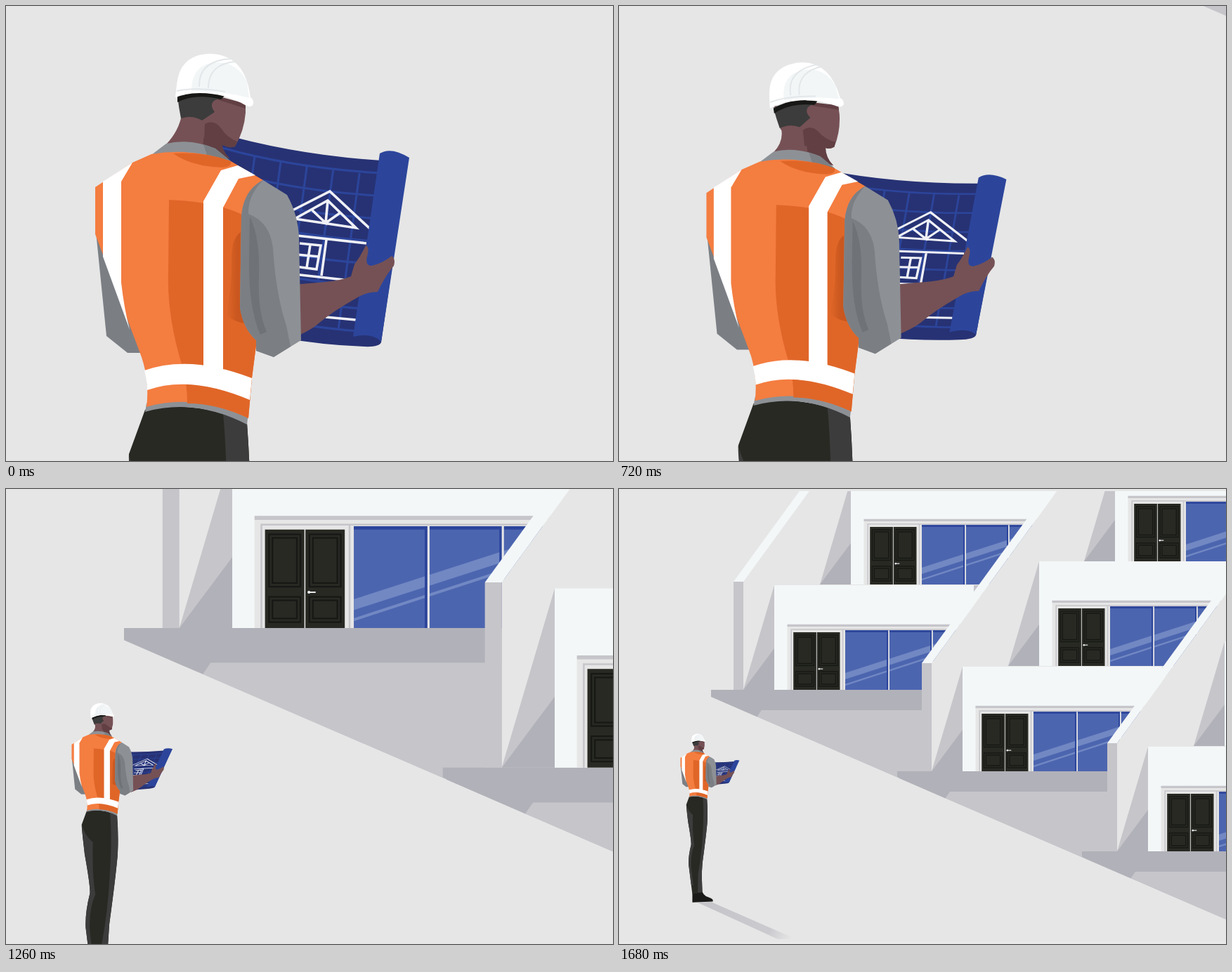
An HTML page that plays this animation: 864 px wide and 648 px high, repeating every 4200 ms.

```html
<!DOCTYPE html>
<html lang="en">
<head>
<meta charset="utf-8">
<title>Site survey</title>
<style>
html, body { margin: 0; width: 100%; height: 100%; overflow: hidden; background: #e6e6e6; }
svg { display: block; width: 100vw; height: 100vh; }
.line { fill: none; stroke: #f0f1f6; stroke-width: 3.6; }
.panel { fill: none; stroke: #171815; stroke-width: 1.3; }
</style>
</head>
<body>
<svg viewBox="0 0 864 648" preserveAspectRatio="none">
<defs>
  <linearGradient id="cast" gradientUnits="userSpaceOnUse" x1="320" y1="1430" x2="1030" y2="1740">
    <stop offset=".1" stop-color="#c6c5ca"/><stop offset=".75" stop-color="#cbcacf"/><stop offset="1" stop-color="#e6e6e6"/>
  </linearGradient>
  <linearGradient id="fold" x1="0" x2="1">
    <stop offset="0" stop-color="#c9571f" stop-opacity="0"/><stop offset=".6" stop-color="#c9571f"/>
  </linearGradient>
  <clipPath id="pane"><path d="M322 201.3H505V286H322z"/></clipPath>

  <g id="leaf">
    <path d="M0 0H32.7V82H0z" fill="#282923"/>
    <path class="panel" d="M3.3 4H29.4V47.5H3.3zM6.2 7H26.5V44.5H6.2zM3.3 56H29.4V77H3.3zM6.2 59H26.5V74H6.2z"/>
  </g>

  <g id="storey">
    <path d="M177 286L221 137V286z" fill="#c6c5ca"/>
    <path d="M177 286L221 227V286z" fill="#b1b1b9"/>
    <path d="M505 137h14v14h-14z" fill="#c6c5ca"/>
    <path d="M221 137H505V286H221z" fill="#f3f7f8"/>
    <path d="M239.5 193H505V286H239.5z" fill="#e6e6e6"/>
    <path d="M239.5 192.7H505V196H239.5z" fill="#c6c5ca"/>
    <path d="M245.2 286V200H505M318.5 286V200" fill="none" stroke="#c6c5ca" stroke-width="1.5"/>
    <use href="#leaf" x="248.2" y="204"/><use href="#leaf" x="281.8" y="204"/>
    <path d="M284.5 256.2H290.3" stroke="#f3f7f8" stroke-width="1.1"/>
    <circle cx="284.7" cy="256.2" r="1.2" fill="#f3f7f8"/>
    <g clip-path="url(#pane)">
      <path d="M322 201H505V286H322z" fill="#4c65af"/>
      <path d="M322 262L505 203V212L322 271z" fill="#7188c3"/>
      <path d="M322 277.8L505 218V220.5L322 280.3z" fill="#7188c3"/>
      <path d="M322 201H505V204H322zM381 201h3v85h-3zM443 201h3v85h-3z" fill="#2c459b"/>
      <path d="M383.2 201h1.8v85h-1.8zM445 201h1.8v85h-1.8z" fill="#e6e6e6"/>
    </g>
  </g>

  <g id="column">
    <path d="M203 315H700V542L196 324.200z" fill="#c6c5ca"/>
    <path d="M131 286H520V315H203L196.500 324.400L131 296z" fill="#b1b1b9"/>
    <path d="M177 132V286H800V-268H468z" fill="#e6e6e6"/>
    <path d="M163 132H177V286H163z" fill="#c6c5ca"/>
    <path d="M163 132H177L468 -268H454z" fill="#f3f7f8"/>
    <use href="#storey"/><use href="#storey" x="109" y="-150"/><use href="#storey" x="217" y="-299"/>
  </g>
</defs>

<g id="site">
  <path d="M-100 645H1100V760H-100z" fill="#e9e9e9"/>
  <use href="#column"/><use href="#column" x="268" y="116"/><use href="#column" x="532" y="230"/>
  <path d="M396 402h4v10l-4-2zM659 516h5v10l-5-2z" fill="#b1b1b9"/>
  <path d="M-100 -700H1500V3H-100z" fill="#e6e6e6"/>
</g>

<g id="man">
  <path d="M267 1437L376 1431L1068 1734H919z" fill="url(#cast)"/>

  <g id="plan">
    <path d="M300 180Q410 212 534 220L560 300L534 479Q531 486 510 485Q450 483 390 472L310 300z" fill="#273274"/>
    <path id="grid" fill="none" stroke="#2c459b" stroke-width="3"/>
    <path class="line" d="M396 297L461 264L520 319M411 303L458 277L498 316zM458 277L455 309L436 291M455 309L475 295M410 326.500L513 338M456 333L449 384M410 382L482 390M455 443L498 447M418 338L448 341L442 375L412 371M433 340L428 373M414 354L446 357"/>
    <path d="M532 210Q548 200 574 216L534 478Q522 465 494 471z" fill="#2c459b"/>
  </g>

  <path id="arm" d="M395 398L455 393Q480 390 491 385L496 368Q505 356 512 341Q518 343 514 357Q511 370 520 370Q535 367 549 356Q555 360 552 370Q540 384 529 407Q510 408 497 417Q465 435 445 452Q432 464 395 478z" fill="#755155"/>

  <path d="M128 322L143 470L173 494H196L170 400z" fill="#7b7f84"/>

  <path d="M224 1364L305 1350Q315 1375 335 1385Q385 1402 391 1415V1428L224 1436z" fill="#1a1a18"/>
  <path d="M198 575L175 638Q174 650 180 700L189 779Q216 930 214 965Q190 1060 194 1130L214 1290L224 1368L305 1352L300 1206L306 1113Q335 900 345 790Q351 700 343 594Q270 560 198 575z" fill="#282923"/>
  <path d="M175 640Q190 690 228 723Q224 880 240 970Q205 1050 215 1160L232 1300L214 1290L194 1130Q190 1060 214 965Q216 930 189 779L180 700zM309 580Q320 700 308 880Q300 1050 270 1206L268 1357L305 1352L300 1206L306 1113Q335 900 345 790Q351 700 343 594z" fill="#3c3c3c"/>

  <path id="neck" fill="#755155"/>
  <path id="nape" fill="#613f43"/>
  <g id="head">
    <path d="M246 126L341 138V152Q339 178 326 200Q318 203 311 199L285 190L250 162z" fill="#755155"/>
    <path d="M283 168Q296 161 306 174Q314 187 329 193L326 200Q318 203 311 199L282 192z" fill="#613f43"/>
    <path d="M304 129L341 139V146L300 133z" fill="#613f43"/>
    <path d="M244 128Q246 145 249 160Q265 155 279 163L297 151Q290 142 295 136Q300 131 309 133L290 122z" fill="#3c3c3c"/>
    <path d="M244 130Q266 117 311 128L306 133Q270 124 244 137z" fill="#171815"/>
    <g id="hat">
      <path d="M241 130Q242 121 243 112Q247 70 289 68Q340 68 348 130Q353 133 352 140Q349 145 342 142Q312 124 276 124Q258 124 241 130z" fill="#fff"/>
      <path d="M264 121Q264 92 285 83Q325 72 343 108L346 131Q310 121 264 121z" fill="#f2f6f7"/>
      <path d="M275 115Q274 77 322 75M288 117Q288 82 328 79M243 121Q270 115 312 122" fill="none" stroke="#e3e7e9" stroke-width="2"/>
    </g>
  </g>

  <path d="M207 212L228 196Q262 188 298 203L320 221Q262 205 207 218z" fill="#8d9196"/>
  <path d="M281 197L298 203L320 221L286 212z" fill="#7b7f84"/>
  <path d="M200 566Q262 546 345 580L343 596Q270 558 198 578z" fill="#8d9196"/>

  <path d="M127 258L180 223L207 211Q262 201 320 221L366 248Q338 262 335 330L334 425Q338 460 357 476L350 530L345 587Q270 551 200 571Q205 530 190 492L127 325z" fill="#f47d40"/>
  <path d="M238 210Q285 207 320 221Q322 229 308 230Q262 228 238 210z" fill="#e06628"/>
  <path d="M232 276Q300 279 336 297L334 425Q338 460 357 476L350 530L345 587Q300 566 258 566Q258 535 250 510Q229 440 231 380z" fill="#e06628"/>
  <path d="M334 322Q321 330 321 360Q322 400 313 440Q325 450 340 452L333 425z" fill="url(#fold)"/>
  <path d="M138 250L180 223L164 250V394Q168 430 176 461L138 357zM281 278L306 234L330 227L355 241L331 246L309 287V522L281 514zM197 519Q262 496 350 530L347 561Q262 525 201 547Q201 535 197 519z" fill="#fff"/>

  <path d="M366 248L400 269Q416 298 417 330L420 476L381 500L356 491V476Q338 460 333 430L335 300Q338 262 366 248z" fill="#8d9196"/>
  <path d="M366 248Q344 270 345 296Q376 308 380 345Q384 410 399 455L405 485L381 500L356 491V476Q338 460 333 430L335 300Q338 262 366 248z" fill="#7b7f84"/>
  <path d="M347 300Q362 330 360 385Q358 435 371 464L362 468Q345 430 346 360z" fill="#6f7378"/>
</g>
</svg>

<script>
const LOOP = 4200, STEP = 30, END = .1748, CX = 79.1, CY = 409.4;
const $ = id => document.getElementById(id);
const set = (id, value, name = 'transform') => $(id).setAttribute(name, value);
const phase = (t, start, length) => Math.min(1, Math.max(0, (t - start) / length));
const smooth = u => u * u * (3 - 2 * u);

// Bezier easing with control points (a, 0) and (b, 1)
function ease(u, a, b) {
  let lo = 0, hi = 1;
  for (let i = 0; i < 30; i++) {
    const m = (lo + hi) / 2, n = 1 - m;
    if (3 * n * n * m * a + 3 * n * m * m * b + m ** 3 < u) lo = m; else hi = m;
  }
  return smooth((lo + hi) / 2);
}

let grid = '';
for (let i = 0; i < 8; i++) {
  const y = 32.5 * i;
  grid += `M308 ${202 + y}Q410 ${231 + y} 536 ${238 + y}`;
}
for (let i = 0; i < 5; i++) {
  const x = 354 + 37.3 * i, y = 214 + 6 * i;
  grid += `M${x} ${y}L${x - 30} ${y + 222}`;
}
set('grid', grid, 'd');

const zoomTo = k => `translate(${CX} ${CY}) scale(${k}) translate(${-CX} ${-CY})`;

function draw(t) {
  const zoom = 1 + (END - 1) * ease(phase(t, 570, 1110), .33, .35);
  const turn = smooth(phase(t, 120, 840));
  const skew = smooth(phase(t, 120, 1250));
  const tilt = smooth(phase(t, 330, 965)), lag = tilt * tilt;

  set('man', zoomTo(zoom));
  set('site', zoomTo(zoom / END));
  set('head', `rotate(${-10.5 * turn} 247 240)`);
  set('hat', `translate(${-3 * turn} ${-2 * turn})`);
  set('neck', `M228 197Q246 178 ${250 - 15 * turn} 155L290 150L306 188Q306 205 318 217Q262 200 228 197`, 'd');
  set('nape', `M${283 - 9 * turn} 168L280 205L318 217Q306 205 306 188L300 170z`, 'd');
  set('plan', `matrix(1 ${-.136 * skew} ${-.17 * lag} ${1 - .33 * tilt} ${69.7 * lag} ${72.4 * skew + 139.3 * tilt})`);
  set('arm', `translate(${7 * turn + 6 * tilt} ${16 * tilt - 9 * turn})`);
}

const begin = performance.now();
function frame() {
  const t = (performance.now() - begin) % LOOP;
  draw(Math.floor(t / STEP) * STEP);
  requestAnimationFrame(frame);
}
frame();
</script>
</body>
</html>
```
